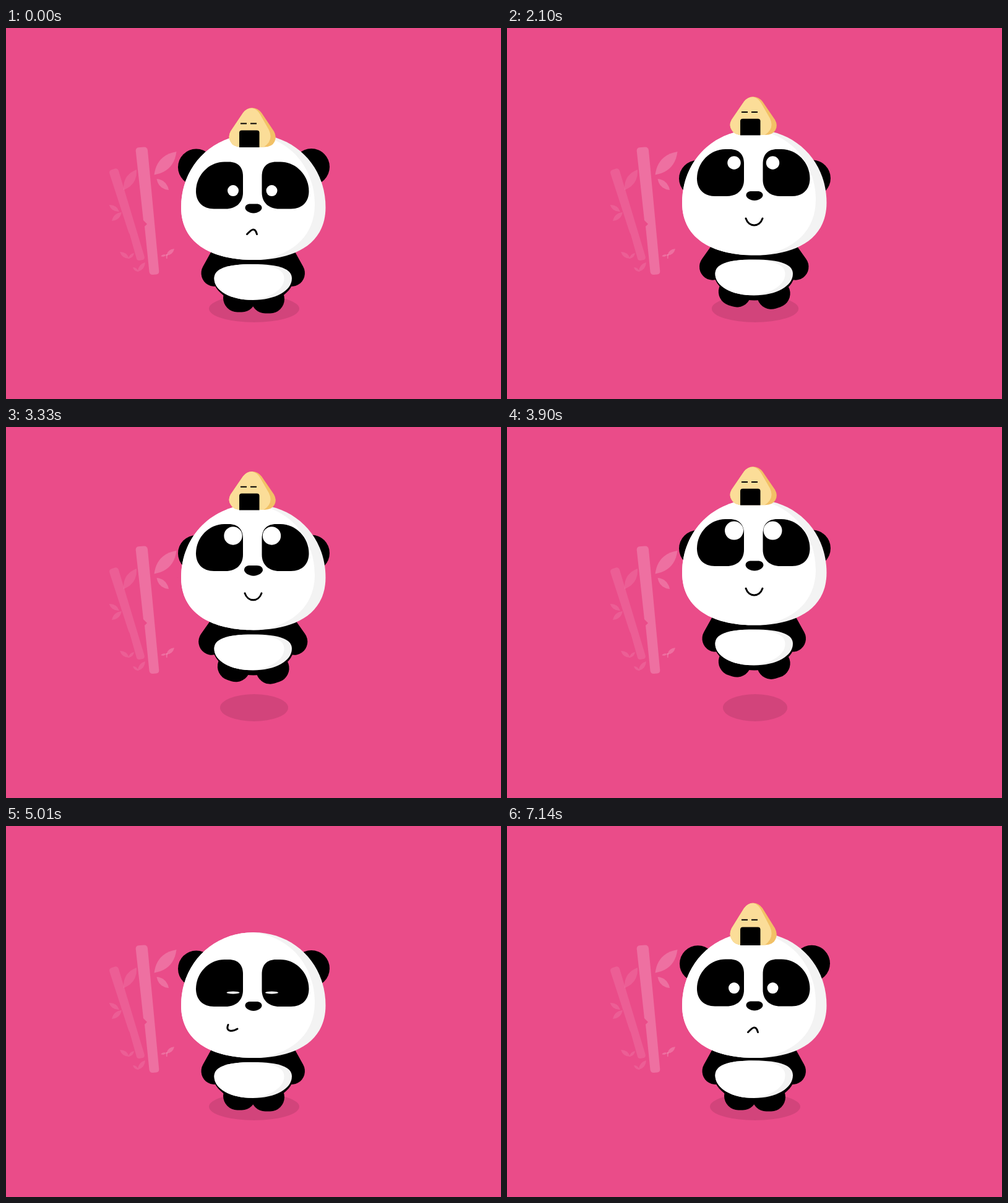
An HTML page for the animation above (7.17 s loop, 800 by 600 pixels).

```html
<!DOCTYPE html>
<html lang="en">
<head>
<meta charset="utf-8">
<title>Panda snack</title>
<style>
html, body { margin: 0; width: 100%; height: 100%; overflow: hidden; background: #ea4c89; }
svg { display: block; width: 100vw; height: 100vh; }
.line { fill: none; stroke: #000; stroke-linecap: round; }
</style>
</head>
<body>
<svg viewBox="0 0 800 600">
  <defs>
    <path id="headShape" d="M283 290C283 222 335 172 400 172S516.500 222 516.500 290C516.500 352 462 375 400 375S283 352 283 290Z"/>
    <path id="bellyShape" d="M336.500 405C336.500 390 355 382 399 382S462 390 462 405C462 425 435 440 399 440S336.500 425 336.500 405Z"/>
    <path id="riceShape" d="M383 137Q389 129 398 129T413 137L433 167Q438 176 434 184Q430 192.500 417 192.500H380Q367 192.500 363 184Q358 176 363 167Z"/>
    <path id="patch" d="M307 264C307 238 328 216.500 353 216.500H360C375 216.500 383 225 383 240V266C383 283 371 292.500 355 292.500H336C318 292.500 307 281 307 264Z"/>
    <clipPath id="headClip"><use href="#headShape"/></clipPath>
    <clipPath id="bellyClip"><use href="#bellyShape"/></clipPath>
    <clipPath id="riceClip"><use href="#riceShape"/></clipPath>
  </defs>

  <g fill="#fff" fill-opacity=".1">
    <path d="M167.500 236Q166 231 170 229.500L176 227.500Q180 226.500 182 231L223.500 369Q225 373.500 221 375L216 376Q212 376.500 211 373L200 334L198 330Z"/>
    <g id="backLeaves"></g>
  </g>
  <g fill="#fff" fill-opacity=".2">
    <path d="M209.700 199Q209.500 194 214 193.300L223 192.500Q228.500 192.500 229 198L247.300 393Q247.500 398 243 398.500L237 399Q232 399 231.500 394L224 321L228 317L222 311Z"/>
    <g id="frontLeaves"></g>
    <path d="M258.500 366H261L260.500 373H259Z"/>
  </g>

  <ellipse id="shadow" cx="401" cy="454" ry="22" fill-opacity=".1"/>

  <g id="panda">
    <rect id="footL" x="351" y="413.500" width="53" height="46" rx="23"/>
    <rect id="footR" x="396" y="415.500" width="54" height="46" rx="23"/>
    <path id="armL" class="line" stroke-width="43" d="M360 355L337 396.500"/>
    <path id="armR" class="line" stroke-width="43" d="M438.500 355L461.500 396.500"/>
    <path d="M345 355H454L466 400C466 430 430 448 400 448S333.500 430 333.500 400Z"/>
    <g id="belly">
      <use href="#bellyShape" fill="#f3f3f3"/>
      <g clip-path="url(#bellyClip)"><use href="#bellyShape" fill="#fff" x="-12.500"/></g>
    </g>
    <g id="head">
      <circle id="earL" cx="307.500" cy="225" r="29.500"/>
      <circle id="earR" cx="493.500" cy="224.500" r="29.500"/>
      <use href="#headShape" fill="#f3f3f3"/>
      <path clip-path="url(#headClip)" fill="#fff" d="M270 160H400V172C465 180 499 232 499 285C499 335 465 368 405 376H270Z"/>
      <g id="face">
        <use href="#patch"/>
        <use href="#patch" transform="translate(796.500) scale(-1 1)"/>
        <ellipse id="eyeL" cx="367" fill="#fff"/>
        <ellipse id="eyeR" cx="429.500" fill="#fff"/>
        <path id="nose" d="M386.500 291C386.500 286 391 284.500 395 284.500H405C410 284.500 413.500 287 413.500 291C413.500 295 407 299.500 400 299.500S386.500 295 386.500 291Z"/>
      </g>
      <path id="mouth" class="line" stroke-width="3"/>
      <path id="open" d="M349 294C349 287 370 284.500 398 284.500S447 287 447 294C447 309 425 316 398 316S349 309 349 294Z"/>
    </g>
  </g>

  <g id="rice">
    <use href="#riceShape" fill="#f2c166"/>
    <path clip-path="url(#riceClip)" fill="#fbdd98" d="M350 120H398V129Q406 131 411 140L425 165Q433 182 416 193H350Z"/>
    <path d="M377 193V169.500Q377 165.500 381 165.500H405.500Q409.500 165.500 409.500 169.500V193Z"/>
    <path stroke="#000" stroke-width="2" d="M379 154.500H389M395 154.500H405"/>
  </g>
</svg>
<script>
const LOOP = 7170;
const el = {};
document.querySelectorAll('[id]').forEach(e => el[e.id] = e);
const set = (id, attrs) => { for (const k in attrs) el[id].setAttribute(k, attrs[k]); };
const move = (id, value) => set(id, { transform: value });
const show = (id, on) => set(id, { visibility: on ? 'visible' : 'hidden' });
const around = (x, y, change) => `translate(${x} ${y}) ${change} translate(${-x} ${-y})`;

// Lens from base to tip, as wide as its length asks for.
function leaf(x1, y1, x2, y2) {
  const mx = (x1 + x2) / 2, my = (y1 + y2) / 2;
  const nx = (y1 - y2) * .37, ny = (x2 - x1) * .37;
  return `<path d="M${x1} ${y1}Q${mx + nx} ${my + ny} ${x2} ${y2}Q${mx - nx} ${my - ny} ${x1} ${y1}Z"/>`;
}
el.frontLeaves.innerHTML = leaf(239.5, 237.5, 275.5, 200) + leaf(243.5, 244, 263, 262)
  + leaf(259, 368, 272, 357) + leaf(250, 369, 259, 367);
el.backLeaves.innerHTML = leaf(190, 262, 211, 229)
  + leaf(166.5, 286, 183, 297) + leaf(171, 312, 187, 298)
  + leaf(184, 362, 199, 373) + leaf(198, 373, 207, 364)
  + leaf(205, 387, 214, 394) + leaf(213, 394, 225, 379);

const mix = (a, b, p) => a + (b - a) * p;
const ramp = (t, a, b) => Math.min(1, Math.max(0, (t - a) / (b - a)));
const ease = (t, a, b) => (1 - Math.cos(Math.PI * ramp(t, a, b))) / 2;
const fall = (t, a, b) => ramp(t, a, b) ** 2;
// Cycles from 0 to 1 and back between two times.
const pulse = (t, a, b, period = b - a) =>
  t > a && t < b ? (1 - Math.cos(2 * Math.PI * (t - a) / period)) / 2 : 0;

// Damped wobble when the snack pops up; it runs on past the loop point.
function wobble(t) {
  const s = (t - 6570 + LOOP) % LOOP;
  return -1.2 * Math.exp(-s / 220) * Math.sin(2 * Math.PI * s / 200);
}

const sad = [389.5, 333.5, 394, 329, 402, 319, 405.5, 333.5];
const smile = [386, 315.5, 391, 330, 408, 330, 413, 315.5];
const chew = [359, 321.5, 354, 333, 366, 333, 374, 328];
const mouths = [sad, smile, chew, sad];

function mouthPath(m) {
  const i = Math.min(Math.floor(m), 2);
  const p = mouths[i].map((v, k) => mix(v, mouths[i + 1][k], m - i));
  return `M${p[0]} ${p[1]}C${p.slice(2).join(' ')}`;
}

function draw(t) {
  const look = ease(t, 450, 850) - ease(t, 4820, 5040);
  const float = ease(t, 1520, 3925);
  const rise = -54.4 * float * (1 - fall(t, 3950, 4180));
  const gape = ease(t, 4000, 4250) - ease(t, 4820, 5000);
  const shut = ease(t, 3950, 4150) - ease(t, 6530, 6650);
  const dangle = ease(t, 1520, 1950) - ease(t, 3950, 4170);
  const spring = wobble(t);

  set('shadow', { rx: 73 + .385 * rise });
  move('panda', `translate(0 ${rise})`);
  move('head', `translate(0 ${-13 * gape})`);
  move('face', `translate(0 ${-13 * look - 19 * gape - 13 * spring})`);

  const out = 5 * pulse(t, 600, 1100) - 14 * spring;
  const down = 26 * (ease(t, 480, 950) - ease(t, 4820, 5100)) - 6 * pulse(t, 5000, 5300) - 32 * spring;
  move('earL', `translate(${-out} ${down})`);
  move('earR', `translate(${out} ${down})`);

  const arm = 11.3 * pulse(t, 1520, 3920, 800) - 2 * pulse(t, 800, 1400) - 7 * gape;
  move('armL', `rotate(${arm} 360 355)`);
  move('armR', `rotate(${-arm} 438.500 355)`);
  move('footL', `translate(${-9.5 * dangle} ${-1.5 * dangle}) rotate(${18 * dangle} 378 437)`);
  move('footR', `translate(${8 * dangle} ${-.5 * dangle}) rotate(${-18 * dangle} 423 439)`);
  move('belly', around(0, 440, `scale(1 ${1 + .7 * Math.max(spring, -.5)})`));

  const size = t < 5000 ? mix(9, 15, ease(t, 1200, 3700)) : 9;
  const eye = {
    cy: 263 + mix(-24 * look - 4 * float * look, 7, shut),
    rx: mix(size, 10.5, shut),
    ry: mix(size, 2, shut)
  };
  set('eyeL', eye);
  set('eyeR', eye);
  move('nose', around(400, 292, `scale(${1 + .12 * pulse(t, 1090, 3980, 340)})`));

  const bite = pulse(t, 5010, 6510, 300);
  set('mouth', { d: mouthPath(ease(t, 650, 950) + ease(t, 4300, 4400) + ease(t, 6520, 6640)) });
  move('mouth', `translate(${4 * bite} ${-3 * bite})`);
  move('open', around(398, 300, `scale(${mix(.3, 1, gape)} ${gape})`));
  show('mouth', gape <= .1);
  show('open', gape > .1);

  // Carried up, tossed, dropped into the mouth, then back on top.
  const flight = -12 * ease(t, 450, 850) - 54.4 * float
    - 35 * ease(t, 3925, 4650) + 209 * fall(t, 4650, 4880);
  const whole = 1 - ease(t, 4790, 4900) + ease(t, 6620, 6700);
  const tall = (1 - .025 * look + .045 * gape) * (1 + spring);
  move('rice', `translate(0 ${t < 5500 ? flight : 0}) ` + around(398, 193, `scale(${whole} ${whole * tall})`));
  show('rice', whole > .01);
}

function tick() {
  draw(performance.now() % LOOP);
  requestAnimationFrame(tick);
}
tick();
</script>
</body>
</html>
```
